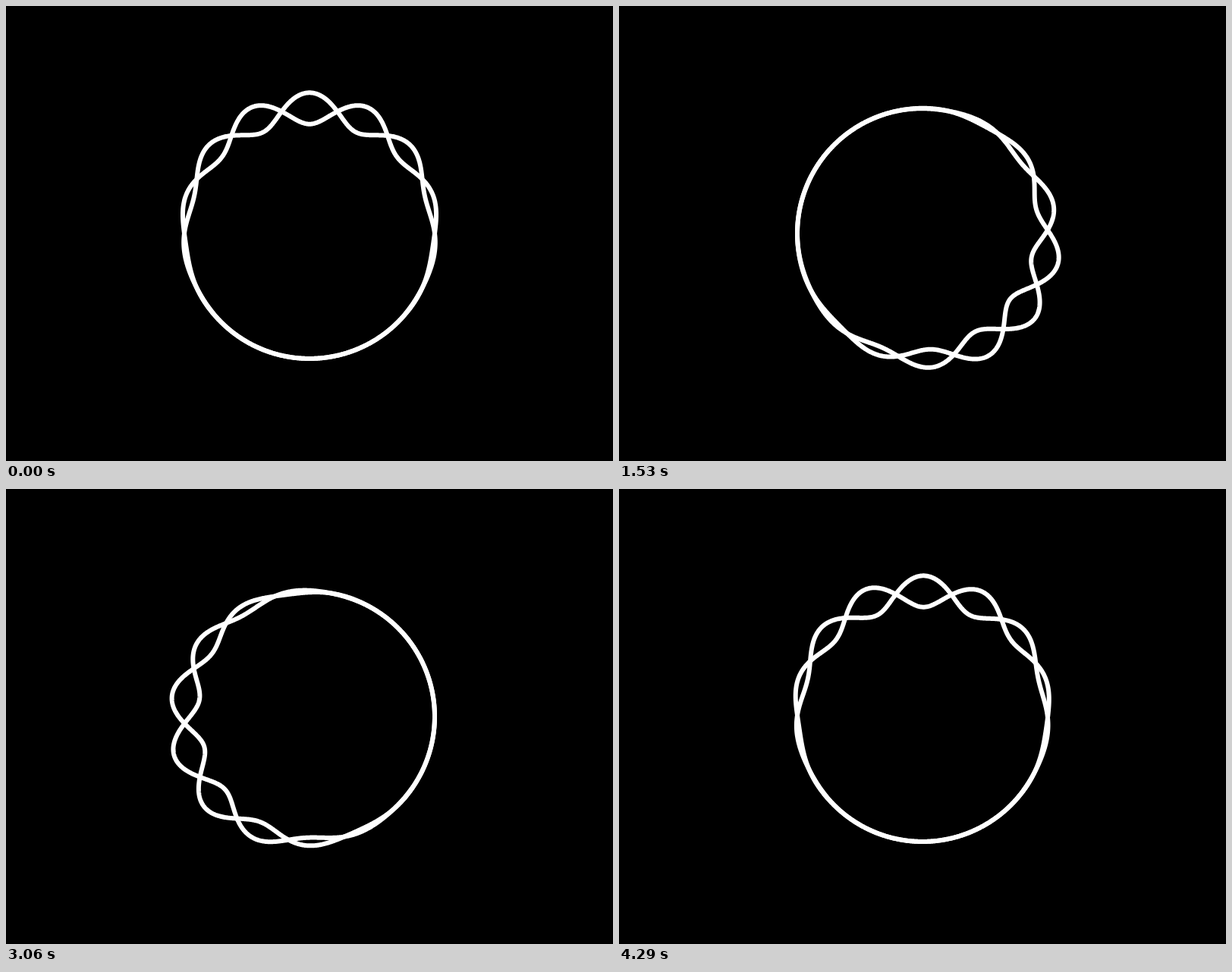
An HTML page with a canvas that plays this animation: 800x600 px, repeating every 4320 ms.

```html
<!DOCTYPE html>
<html lang="en">
<head>
<meta charset="utf-8">
<title>Braided ring</title>
<style>
  html, body { margin: 0; width: 100%; height: 100%; overflow: hidden; background: #000; }
  canvas { display: block; }
</style>
</head>
<body>
<canvas id="stage" width="800" height="600"></canvas>
<script>
  const ctx = document.getElementById('stage').getContext('2d');
  const TAU = 2 * Math.PI;
  const LOOP = 4320, STEP = 30;
  const RADIUS = 165, SWING = 20.7, WAVES = 7, POINTS = 1080;

  // The swell travels clockwise once per loop; the ripples drift backwards by 1.5 waves.
  function offset(angle, p) {
    const swell = (1 + Math.cos(angle - TAU * p)) / 2;
    return SWING * Math.pow(swell, 2.75) * Math.cos(WAVES * angle + 1.5 * TAU * p);
  }

  function strand(sign, p) {
    ctx.beginPath();
    for (let i = 0; i < POINTS; i++) {
      const angle = TAU * i / POINTS;
      const r = RADIUS + sign * offset(angle, p);
      ctx.lineTo(400 + r * Math.sin(angle), 300 - r * Math.cos(angle));
    }
    ctx.closePath();
    ctx.stroke();
  }

  function draw(time) {
    const p = Math.floor(time % LOOP / STEP) * STEP / LOOP;
    ctx.fillStyle = '#000';
    ctx.fillRect(0, 0, 800, 600);
    ctx.strokeStyle = '#fff';
    ctx.lineWidth = 6;
    ctx.lineJoin = 'round';
    strand(1, p);
    strand(-1, p);
  }

  function tick() {
    draw(performance.now());
    requestAnimationFrame(tick);
  }
  tick();
</script>
</body>
</html>
```
